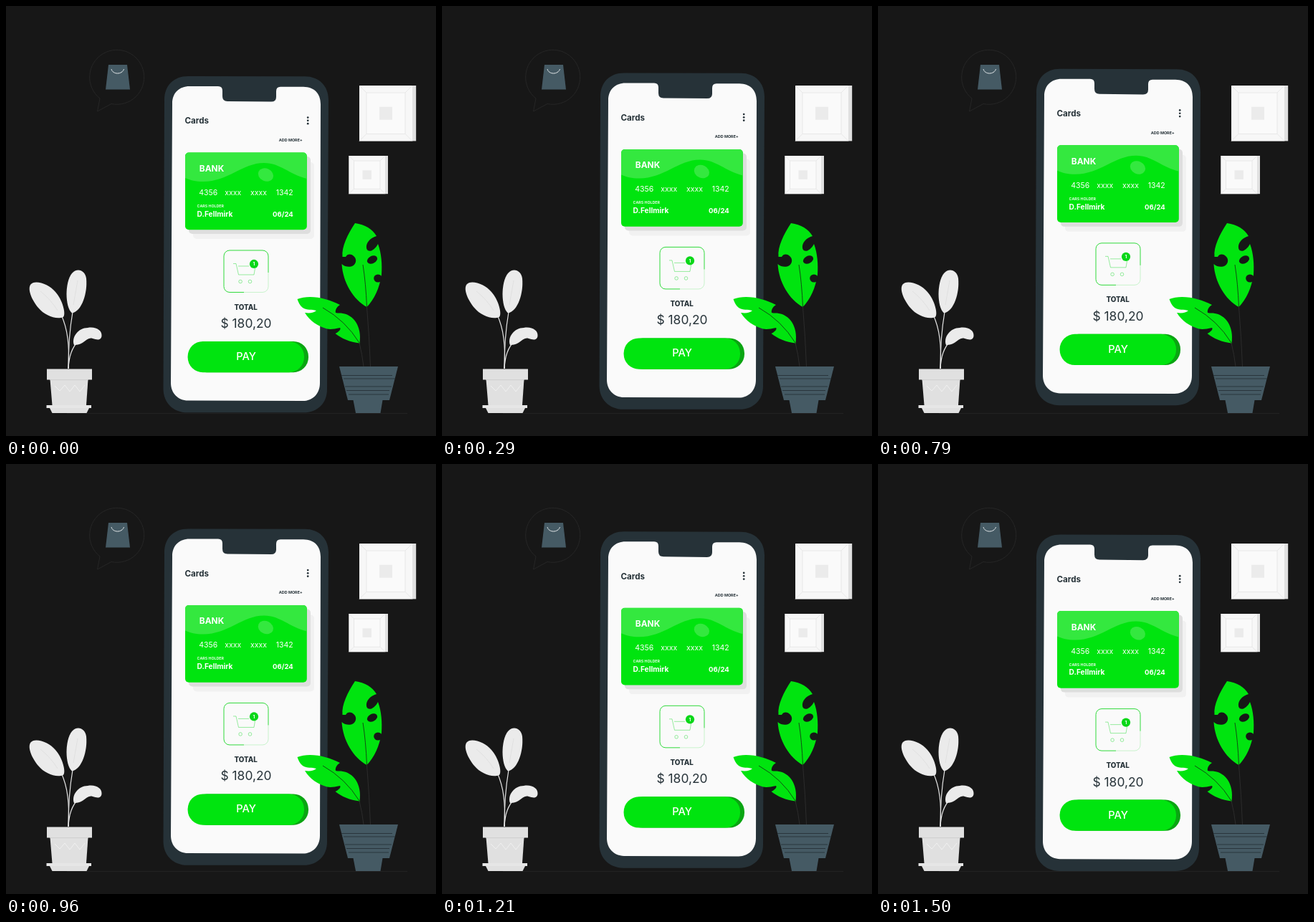
These frames come from a looping animation (600 by 600 pixels, 1540 ms). An HTML page with a canvas:

```html
<!DOCTYPE html>
<html lang="en">
<head>
<meta charset="utf-8">
<title>Mobile payment</title>
<style>
html, body { margin: 0; width: 100%; height: 100%; overflow: hidden; background: #171717; }
canvas { display: block; width: 600px; height: 600px; }
</style>
</head>
<body>
<canvas id="stage" width="600" height="600"></canvas>
<script>
const ctx = document.getElementById('stage').getContext('2d');
const LOOP = 1540, STEPS = 37;
const BG = '#171717', GREEN = '#00e40f', DARK = '#263238', SLATE = '#455a64';
const PAPER = '#fafafa', PALE = '#ebebeb', GREY = '#e0e0e0';

function fill(d, color) {
  ctx.fillStyle = color;
  ctx.fill(new Path2D(d));
}
function line(d, color, width = 1) {
  ctx.strokeStyle = color;
  ctx.lineWidth = width;
  ctx.stroke(new Path2D(d));
}
function rect(x, y, w, h, color) {
  ctx.fillStyle = color;
  ctx.fillRect(x, y, w, h);
}
function round(x, y, w, h, r, color) {
  ctx.beginPath();
  ctx.roundRect(x, y, w, h, r);
  ctx.fillStyle = color;
  ctx.fill();
}
function oval(x, y, rx, ry, deg, color) {
  ctx.beginPath();
  ctx.ellipse(x, y, rx, ry, deg * Math.PI / 180, 0, 2 * Math.PI);
  ctx.fillStyle = color;
  ctx.fill();
}
function text(str, x, y, size, weight, color) {
  ctx.font = `${weight} ${size}px Inter, Lato, sans-serif`;
  ctx.textAlign = 'center';
  ctx.fillStyle = color;
  ctx.fillText(str, x, y);
}

function bubble() {
  line('M131 129 A38 38 0 1 1 147 136.5 L127.5 147 Z', '#262626');
  fill('M143 82 H169 L173 116.5 H139 Z', SLATE);
  line('M147 88 C149 96 162 96 164.5 88', '#e6eaec');
}

function wallFrame(x, y, w, h, side, inset, core) {
  const r = x + w, b = y + h, i = inset;
  rect(x, y, w + side, h, GREY);
  rect(x, y, w, h, '#f7f7f7');
  rect(x + i, y + i, w - 2 * i, h - 2 * i, PAPER);
  ctx.strokeStyle = '#e4e4e4';
  ctx.lineWidth = 0.8;
  ctx.strokeRect(x + i, y + i, w - 2 * i, h - 2 * i);
  line(`M${x} ${y} l${i} ${i} M${r} ${y} l${-i} ${i} M${x} ${b} l${i} ${-i} M${r} ${b} l${-i} ${-i}`, '#e4e4e4', 0.8);
  rect(x + w / 2 - core / 2, y + h / 2 - core / 2, core, core, PALE);
}

function palePlant() {
  line('M87 506 C89 475 86 450 77 431', '#e6e6e6', 1.2);
  line('M87 506 C87 480 89 450 93 427', '#e6e6e6', 1.2);
  line('M87 506 C88 488 92 477 101 467', '#e6e6e6', 1.2);
  fill('M80 434 C70 438 54 432 45 421 C36 410 30 396 34 389 C40 381 60 388 69 399 C79 410 84 430 80 434 Z', PALE);
  fill('M92 428.5 C82 420 82 385 92 373 C99 365 110 368 112 380 C114 400 106 426 92 428.5 Z', PALE);
  fill('M95 473 C91 462 101 449 114 449 C126 447 134 453 133.5 460 C133 467 127 466 121 464 C112 461 109 474 95 473 Z', PALE);
  line('M48 398 Q62 409 72 425 M100 383 Q97 400 94 417', '#dedede', 0.8);
  rect(57, 506.5, 63, 15, GREY);
  fill('M61.5 521 H114.5 L112 557 H64.5 Z', GREY);
  rect(61.5, 521, 53, 1.2, '#d0d0d0');
  line('M68 530 L75 537 L82 529 L89 538 L96 529 L103 538 L110 529', '#f0f0f0');
  rect(56.5, 557, 62.5, 4, '#e6e6e6');
  fill('M61 561 H116 L112.5 568 H64.5 Z', GREY);
}

function greenPlant() {
  line('M503.5 420 Q507 462 508.5 503', '#2c2c2c');
  line('M493 470 Q497 486 499 503', '#2c2c2c');
  fill('M487 303 C501 305 511 311 517 321 C508 324 502 330 503 338 C505 345 514 342 519 332 ' +
       'C524 345 525 361 524 375 C521 394 514 409 503.5 420 C485 410 470 386 468.5 360 ' +
       'C475 366 486 365 488 357 C490 349 478 342 474 350 L469.5 350 C468 336 477 318 487 303 Z', GREEN);
  oval(511, 354, 7.5, 5.2, -28, BG);
  oval(519, 380, 5.8, 5.5, 0, BG);
  line('M498 361 Q502 386 503.5 420', '#123f14', 0.9);
  fill('M406.5 409 C424 402 449 408 466 417 C461 420 459 425 460 428 C463 429 467 428 470 429 ' +
       'C484 431 497 446 493.5 470.5 C480 469 468 464 459.5 457 C464 455 468 451 466 449 C458 451 452 451.5 448 450.5 ' +
       'C436 447 424 440 417 428 C424 429 430 428 433 425 C427 423 420 425 414 421 C410 418 408 413 406.5 409 Z', GREEN);
  line('M442 421 Q474 439 493 470', '#123f14', 0.9);
  fill('M465 503 H547 L535 550 H477 Z', SLATE);
  fill('M484.5 550 H525.5 L522.5 568 H488 Z', SLATE);
  line('M468 515.5 H539 M471 520 H543 M473 531 H538 M475 536.5 H535 M478 542 H534', DARK, 0.9);
}

function card() {
  round(261, 218, 169, 107, 5, '#f1f1f1');
  round(255, 210, 170, 108, 5, '#dedede');
  ctx.save();
  ctx.beginPath();
  ctx.roundRect(250, 204.5, 169.8, 107.7, 5);
  ctx.clip();
  rect(250, 204, 170, 109, GREEN);
  fill('M250 204 H420 V241 C395 235 383 219 360 219 C330 219 310 245 275 245 C265 245 257 243 250 240 Z', '#34e83f');
  ctx.restore();
  oval(362.4, 235.6, 11, 8.8, 25, '#34e83f');
  text('BANK', 287, 231, 11.9, 700, '#fff');
  text('4356', 282.2, 264, 10.5, 400, '#fff');
  text('xxxx', 316.8, 264, 10.5, 400, '#fff');
  text('xxxx', 352.4, 264, 10.5, 400, '#fff');
  text('1342', 388.6, 264, 10.5, 400, '#fff');
  text('CARS HOLDER', 285.3, 281, 5.3, 600, '#fff');
  text('D.Fellmirk', 291.5, 293.8, 10.2, 700, '#fff');
  text('06/24', 386.4, 293.8, 9.6, 700, '#fff');
}

function cart() {
  const soft = 'rgba(0,212,20,.5)';
  line('M332 399.5 H312 A8 8 0 0 1 304 391.5 V349 A8 8 0 0 1 312 341 H358 A8 8 0 0 1 366 349 V372', '#30da3b', 1);
  line('M366 372 V391.5 A8 8 0 0 1 358 399.5 H332', 'rgba(0,212,20,.25)', 0.8);
  line('M317 359.5 H321 L324.5 375 H346 L348 363 M324 363 H339', soft, 0.8);
  line('M329.4 384.5 a2.3 2.3 0 1 0 -4.6 0 a2.3 2.3 0 1 0 4.6 0 M342.8 384.5 a2.3 2.3 0 1 0 -4.6 0 a2.3 2.3 0 1 0 4.6 0', soft, 0.8);
  oval(346, 360, 6.1, 6.1, 0, '#08d718');
  text('1', 346, 362.3, 6.5, 700, '#fff');
}

function phone() {
  fill('M221 131 C221 111 234 98 254 98 L417 98.4 C437 98.4 450 112 450 131 L448 535 ' +
       'C448 554 435 567.3 415 567.3 L253 567.3 C233 567.3 219.5 553 219.5 534 Z', DARK);
  fill('M232 136 C232 121 242 112 256 112 H296 Q302 112 302 118 V126 Q302 133 309 133 L370 133.6 ' +
       'Q377 133.6 377 127 V119 Q377 112.8 383 112.8 H415 C430 113 439 122 439 137 L438 526 ' +
       'C438 541 428 551.1 414 551.1 L254 550.6 C240 550.6 230 540 230 526 Z', PAPER);
  text('Cards', 266.3, 164.3, 11.6, 700, DARK);
  for (const y of [155.6, 159.9, 164.2]) oval(421.2, y, 1.35, 1.35, 0, DARK);
  text('ADD MORE+', 397.2, 189, 5.4, 700, DARK);
  card();
  cart();
  text('TOTAL', 334.6, 423.6, 9.8, 800, DARK);
  text('$ 180,20', 335, 449, 17.4, 400, DARK);
  round(259, 468, 163, 43.2, 21, '#0aa512');
  round(253.6, 468, 162.4, 43.2, 21, GREEN);
  text('PAY', 335, 494, 14.6, 500, '#fff');
}

// Steady bob: highest at 720 ms, lowest half a loop later.
function bob(t) {
  const step = Math.floor((t % LOOP + 3) * STEPS / LOOP) % STEPS;
  const time = step * LOOP / STEPS;
  const fromTop = Math.abs(time - 720);
  return -11.25 + 12 * Math.min(fromTop, LOOP - fromTop) / (LOOP / 2);
}

function draw(t) {
  rect(0, 0, 600, 600, BG);
  line('M85 568.5 H560', '#222');
  bubble();
  wallFrame(493, 111, 74, 77.4, 5.2, 10, 18);
  wallFrame(478.5, 209, 50.5, 53.2, 4, 7, 12.5);
  palePlant();
  ctx.save();
  ctx.translate(0, bob(t));
  phone();
  ctx.restore();
  greenPlant();
}

let start;
function tick(now) {
  start ??= now;
  draw(now - start);
  requestAnimationFrame(tick);
}
draw(0);
requestAnimationFrame(tick);
</script>
</body>
</html>
```
